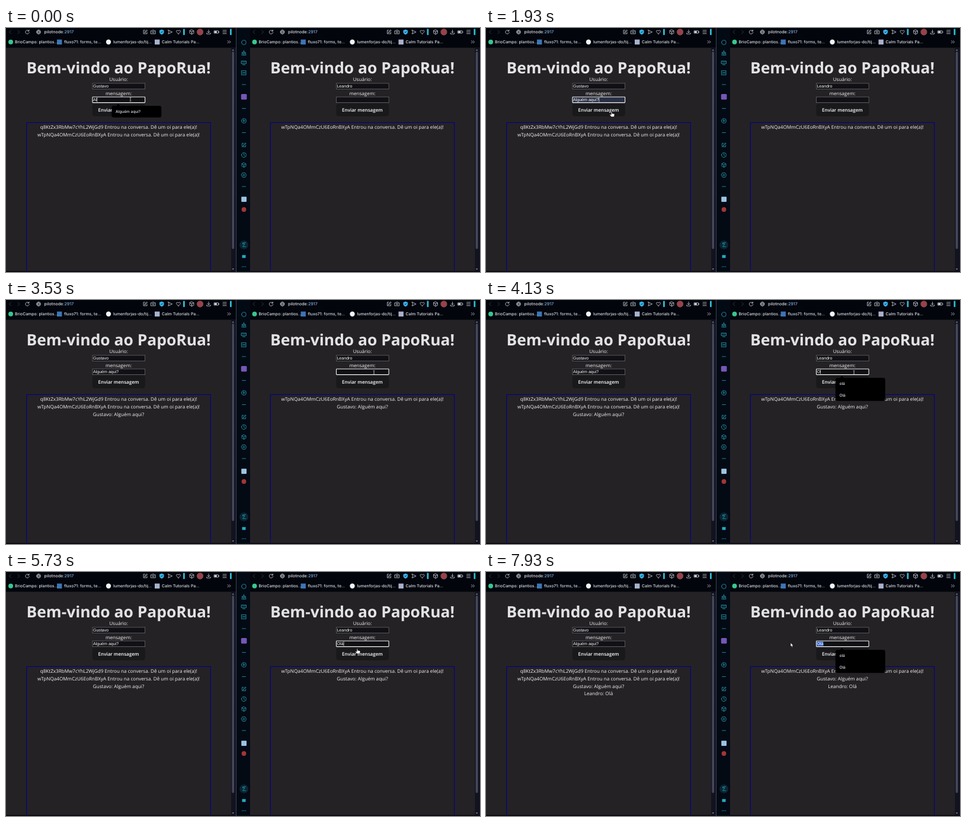
Recreate the animation shown at these times as an HTML page. Size 800 by 414 pixels, loop 8000 ms.

```html
<!DOCTYPE html>
<html lang="pt-BR">
<head>
<meta charset="utf-8">
<title>Chat</title>
<style>
  html, body { margin: 0; width: 100%; height: 100%; overflow: hidden; background: #02050c; }
  svg { display: block; width: 100%; height: 100%; }
  text { text-rendering: geometricPrecision; white-space: pre; }
  .page { font: 8.15px "Open Sans", sans-serif; fill: #f3f2f4; text-anchor: middle; }
  .title { font-size: 26.4px; font-weight: 700; fill: #e3e2e4; }
  .send { font-size: 8px; font-weight: 600; fill: #fff; }
  .field { font: 7.1px "Liberation Sans", Arial, sans-serif; fill: #fff; }
  .ui { font: 500 6.9px Inter, sans-serif; fill: #dfe3ea; }
  .url { font-size: 7.1px; }
  .option { font-size: 6.5px; }
  .line { fill: none; stroke: #d5dae2; stroke-width: .8; stroke-linecap: round; stroke-linejoin: round; }
  .cyan { stroke: #2aa6bd; }
</style>
</head>
<body>
<svg id="stage" viewBox="0 0 800 414" preserveAspectRatio="none"></svg>
<script>
const LOOP = 8000, SHIFT = 411.5;
const stage = document.getElementById('stage');

const rect = (x, y, w, h, fill, more = '') =>
  `<rect x="${x}" y="${y}" width="${w}" height="${h}" fill="${fill}" ${more}/>`;
const dot = (x, y, r, fill) => `<circle cx="${x}" cy="${y}" r="${r}" fill="${fill}"/>`;
const text = (cls, x, y, str, more = '') => `<text class="${cls}" x="${x}" y="${y}" ${more}>${str}</text>`;
const icon = (x, y, d, cls = '', more = '') =>
  `<path class="line ${cls}" transform="translate(${x} ${y})" d="${d}" ${more}/>`;

// Icon outlines, centred on 0,0
const ring = r => `M${-r} 0a${r} ${r} 0 1 0 ${2 * r} 0a${r} ${r} 0 1 0 ${-2 * r} 0`;
const shapes = {
  back: 'M1.5-3L-1.5 0L1.5 3',
  next: 'M-1.5-3L1.5 0L-1.5 3',
  reload: 'M2.6-1.8A3.2 3.2 0 1 0 3.2 .6M2.9-3.6V-1.5H.8',
  globe: ring(3.4) + 'M-3.4 0H3.4M0-3.4C-2-1-2 1 0 3.4C2 1 2-1 0-3.4',
  edit: 'M-.5-3H-3V3H3V.5M-1 1L0-1.2L2.6-3.6L3.6-2.6L1.2 0Z',
  camera: 'M-3.7-2H-2L-1.2-3.2H1.2L2-2H3.7V3H-3.7Z' + ring(1.3),
  plane: 'M-3.2-3.3L3.6 0L-3.2 3.3L-2 0Z',
  heart: 'M0 3.2C-6-1-3-4.6 0-1.8C3-4.6 6-1 0 3.2Z',
  cube: 'M0-3.8L3.4-2V2L0 3.8L-3.4 2V-2ZM-3.4-2L0-.2L3.4-2M0-.2V3.8',
  download: 'M0-3.5V1.2M-2-.8L0 1.2L2-.8M-3.2 1.5V3.3H3.2V1.5',
  battery: 'M-4-2H3V2H-4ZM4-.6V.6',
  menu: 'M-3-2.8H3M-3 0H3M-3 2.8H3',
  more: 'M-2.5-2L-.5 0L-2.5 2M.5-2L2.5 0L.5 2',
  brush: 'M0-4V-1M-2.6-1H2.6V1H-2.6ZM-2.6 1L-3.6 4H3.6L2.6 1M0 2V4',
  keys: 'M-4-3H4V1.5H-4ZM-2.5-1.2H-1.5M-.3-1.2H.5M1.7-1.2H2.5M-2 3.5H2',
  mods: 'M-3.6-3.6H3.6V3.6H-3.6ZM-1.6 1.6V-1.4L0 .4L1.6-1.4V1.6',
  play: ring(4) + 'M-1-1.7V1.7L1.8 0Z',
  clock: ring(4) + 'M0-2.3V0L1.6 1',
  hexagon: 'M-2.1-3.7H2.1L4.2 0L2.1 3.7H-2.1L-4.2 0Z' + ring(1.4),
  dash: 'M-2.8 0H2.8',
  lamp: 'M3-3.6H-1.5L-2.5-1.8H1.5L-2 3H3'
};

const bookmarks = [
  [15, 'BrioCampo: plantios...'], [98, 'fluxo71: forms, te...'],
  [181, 'lumenforjas-do/tij...'], [263, 'Calm Tutorials Pa...']
];

function browserWindow(id, shift, user) {
  const bar = (name, x, more) => icon(x, 6.8, shapes[name], '', more);
  const pageBits =
    rect(0, 33.5, 388, 379, '#242225') +
    rect(380, 33.5, 8, 379, '#12131f') + rect(381.3, 40, 3.8, 335, '#44475c', 'rx="1.9"') +
    `<path fill="#777b90" d="M381.3 38.4L383.2 36L385.1 38.4ZM381.3 408L383.2 410.4L385.1 408Z"/>` +
    text('page title', 190, 76.5, 'Bem-vindo ao PapoRua!') +
    text('page', 190, 90.3, 'Usuário:') + text('page', 190, 113.6, 'mensagem:') +
    rect(146, 93.9, 88.6, 9.6, '#111014', 'stroke="#68676c" stroke-width=".8"') +
    text('field', 146.9, 101.1, user) +
    rect(146, 117, 88.6, 9.6, '#111014', `id="${id}Box" stroke-width=".8"`) +
    rect(146.9, 118, 0, 7.6, '#3a6bd0', `id="${id}Sel"`) +
    text('field', 146.9, 124.2, '', `id="${id}Msg"`) +
    rect(0, 118, .7, 7.4, '#fff', `id="${id}Caret"`) +
    rect(145.8, 128, 89, 21.8, '#19181b', `id="${id}Btn" rx="4.2" stroke-width="1.1"`) +
    text('page send', 190, 142, 'Enviar mensagem') +
    `<path d="M34.8 412.5V160.5H345.3V412.5" fill="none" stroke="#00008b" stroke-width="1.07"/>` +
    `<g id="${id}Log"></g><g id="${id}Pop"></g>`;
  const topBits =
    bar('back', 7, 'opacity=".3"') + bar('next', 21.5, 'opacity=".3"') + bar('reload', 36) + bar('globe', 55) +
    text('ui url', 64.5, 9.2, 'pilotnode<tspan fill="#7fb2e6">:2917</tspan>') +
    bar('edit', 235) + bar('camera', 248.5) +
    `<path d="M262.8 2.6L266.6 4V7C266.6 9 265 10.4 262.8 11.2C260.6 10.4 259 9 259 7V4Z" fill="#35b5ea"/>` +
    icon(262.8, 6.8, 'M-1.5 0L-.3 1.2L1.6-1.1', '', 'style="stroke:#06101c"') +
    bar('plane', 277) + bar('heart', 291) + rect(299, 1.5, 2.8, 10.5, '#35b9dc', 'rx="1"') +
    bar('cube', 313.5) + dot(327.5, 6.8, 5.6, '#93444a') + bar('download', 342) + bar('battery', 355.5) +
    rect(351.8, 5.3, 4, 3, '#d5dae2') + bar('menu', 369) + rect(378, 1.5, 2.8, 10.5, '#35b9dc', 'rx="1"') +
    dot(8, 23.8, 4, '#35c98b') + rect(86, 19.6, 8.4, 8.4, '#3d74b5') +
    dot(173, 23.8, 4.2, '#f2f3f5') + rect(251, 19.6, 8.4, 8.4, '#a9b1cf') +
    bookmarks.map(([x, s]) => text('ui', x, 26.1, s)).join('') + icon(376.5, 23.6, shapes.more);
  return `<g transform="translate(${shift} 0)">${pageBits}${topBits}</g>`;
}

function sidebar() {
  const items = [['brush', 42], ['keys', 59], ['mods', 76], ['dash', 96], ['dash', 136.5], ['play', 157.5],
    ['dash', 177.5], ['edit', 198.5], ['clock', 215.5], ['cube', 232.5], ['hexagon', 249.5], ['dash', 269]];
  return rect(388, 0, 24, 414, '#030a13') + rect(388, 0, 1, 414, '#3a4552') +
    icon(401.5, 24.5, ring(3.8), 'cyan') +
    items.map(([name, y]) => icon(401.5, y, shapes[name], 'cyan')).join('') +
    rect(396.8, 112, 9.6, 9.6, '#7657b8', 'rx="1.5"') + rect(397.2, 286.3, 8.8, 8.8, '#9cc4e2', 'rx="1"') +
    dot(401.5, 308, 3.9, '#a5343a') + dot(401.5, 368, 7.6, '#0a2433') +
    icon(401.5, 368, shapes.lamp, 'cyan') + rect(398.5, 385.2, 6, 5, '#2aa6bd') +
    [398.7, 401.5, 404.3].map(x => dot(x, 405, .75, '#2aa6bd')).join('');
}

const cursors = {
  beam: '<path d="M-1.3-3.2H-.3M.3-3.2H1.3M0-3V3M-1.3 3.2H-.3M.3 3.2H1.3" stroke="#d8d8d8" stroke-width=".8" fill="none"/>',
  arrow: '<path d="M0 0V6.6L1.5 5.3L2.6 7.8L3.8 7.3L2.8 4.9H4.8Z" fill="#fff" stroke="#000" stroke-width=".5"/>',
  hand: '<path d="M-.8 .6Q0-.6 .8 .6V3L4 3.6Q5.2 4 5 5.4L4.2 8.8H-.6L-3.2 5.4Q-3 4-1.8 4.6L-.8 5.4Z" fill="#fff" stroke="#000" stroke-width=".6"/>'
};

stage.innerHTML = rect(0, 0, 800, 414, '#02050c') + browserWindow('a', 0, 'Gustavo') +
  browserWindow('b', SHIFT, 'Leandro') + sidebar() + '<g id="cursor"></g>';
const $ = id => document.getElementById(id);

const joined = id => id + ' Entrou na conversa. Dê um oi para ele(a)!';
const first = joined('q8KtZx3RbMw7cYhL2WjGd9'), second = joined('wTpNQa4OMmCzU6EoRnBXyA');
const ask = 'Gustavo: Alguém aqui?', reply = 'Leandro: Olá';

// [start, value] steps
const steps = {
  a: {
    text: [[0, 'Al'], [1600, 'Alguém aqui?']],
    focus: [[0, 'field'], [2270, 'button'], [3000, '']],
    menu: [[0, ['Alguém aqui?']], [1600, []]],
    filled: [[0, false], [1600, true], [2270, false]],
    selected: [[0, false]],
    log: [[0, [first, second]], [2340, [first, second, ask]], [6200, [first, second, ask, reply]]]
  },
  b: {
    text: [[0, ''], [4130, 'O'], [4330, 'Ol'], [4600, 'Olá']],
    focus: [[0, ''], [3000, 'field'], [6130, 'button'], [7000, 'field']],
    menu: [[0, []], [4130, ['olá', 'Olá']], [5600, []], [7400, ['olá', 'Olá']]],
    filled: [[0, false]],
    selected: [[0, false], [7200, true]],
    log: [[0, [second]], [2340, [second, ask]], [6200, [second, ask, reply]]]
  }
};
// time, x, y
const route = [[0, 210, 121], [800, 210, 121], [1200, 217, 132], [1330, 217, 132], [1560, 215, 141],
  [1900, 212, 142], [2400, 212, 142], [2950, 621, 123], [4300, 621, 123], [4500, 620, 123],
  [5350, 620, 123], [5900, 585, 132], [6600, 585, 132], [6950, 578, 122], [7100, 575, 122],
  [7450, 514, 120], [8000, 514, 120]];

const current = (list, t) => list.filter(([start]) => start <= t).pop();
const at = (list, t) => current(list, t)[1];

function setHTML(el, html) {
  if (el.shown !== html) { el.innerHTML = html; el.shown = html; }
}

function popup(items, x) {
  if (!items.length) return '';
  return `<path d="M${x + 7.5} 132.5L${x + 11} 128.8L${x + 14.5} 132.5Z" fill="#000"/>` +
    rect(x, 132, 84, 19.5 * items.length + .3, '#000', 'rx="3.5"') +
    items.map((s, i) => text('ui option', x + 6.7, 144.2 + 19.3 * i, s)).join('');
}

function drawWindow(id, t) {
  const s = steps[id], focus = at(s.focus, t), msg = $(id + 'Msg'), box = $(id + 'Box');
  setHTML(msg, at(s.text, t));
  const width = msg.textContent ? msg.getComputedTextLength() : 0;
  const selected = at(s.selected, t), inField = focus === 'field';
  box.setAttribute('fill', at(s.filled, t) ? '#2a3045' : '#111014');
  box.setAttribute('stroke', inField ? '#f4f4f4' : '#68676c');
  box.setAttribute('stroke-width', inField ? 1.1 : .8);
  box.setAttribute('rx', inField ? .8 : 0);
  $(id + 'Sel').setAttribute('width', selected ? width : 0);
  const since = t - Math.max(current(s.text, t)[0], current(s.focus, t)[0]);
  $(id + 'Caret').setAttribute('x', 147.1 + width);
  $(id + 'Caret').setAttribute('opacity', inField && !selected && since % 1000 < 500 ? 1 : 0);
  $(id + 'Btn').setAttribute('stroke', focus === 'button' ? '#fff' : 'none');
  setHTML($(id + 'Log'), at(s.log, t).map((m, i) => text('page', 190, 170.9 + 12.8 * i, m)).join(''));
  setHTML($(id + 'Pop'), popup(at(s.menu, t), 178.3));
}

function drawCursor(t) {
  const i = route.findIndex(([time]) => time > t);
  const [t0, x0, y0] = route[i - 1], [t1, x1, y1] = route[i];
  const p = (t - t0) / (t1 - t0), ease = p * p * (3 - 2 * p);
  const x = x0 + (x1 - x0) * ease, y = y0 + (y1 - y0) * ease;
  const id = x < 400 ? 'a' : 'b', localX = id === 'a' ? x : x - SHIFT;
  const inside = localX > 145.5 && localX < 235;
  let kind = 'arrow';
  if (inside && y > 116.5 && y < 127) kind = 'beam';
  else if (inside && y >= 128 && y < 150 && !at(steps[id].menu, t).length) kind = 'hand';
  setHTML($('cursor'), cursors[kind]);
  $('cursor').setAttribute('transform', `translate(${x} ${y})`);
}

function draw(now) {
  const t = Math.max(0, now) % LOOP;
  drawWindow('a', t);
  drawWindow('b', t);
  drawCursor(t);
}

const began = performance.now();
function tick() {
  draw(performance.now() - began);
  requestAnimationFrame(tick);
}
tick();
</script>
</body>
</html>
```
